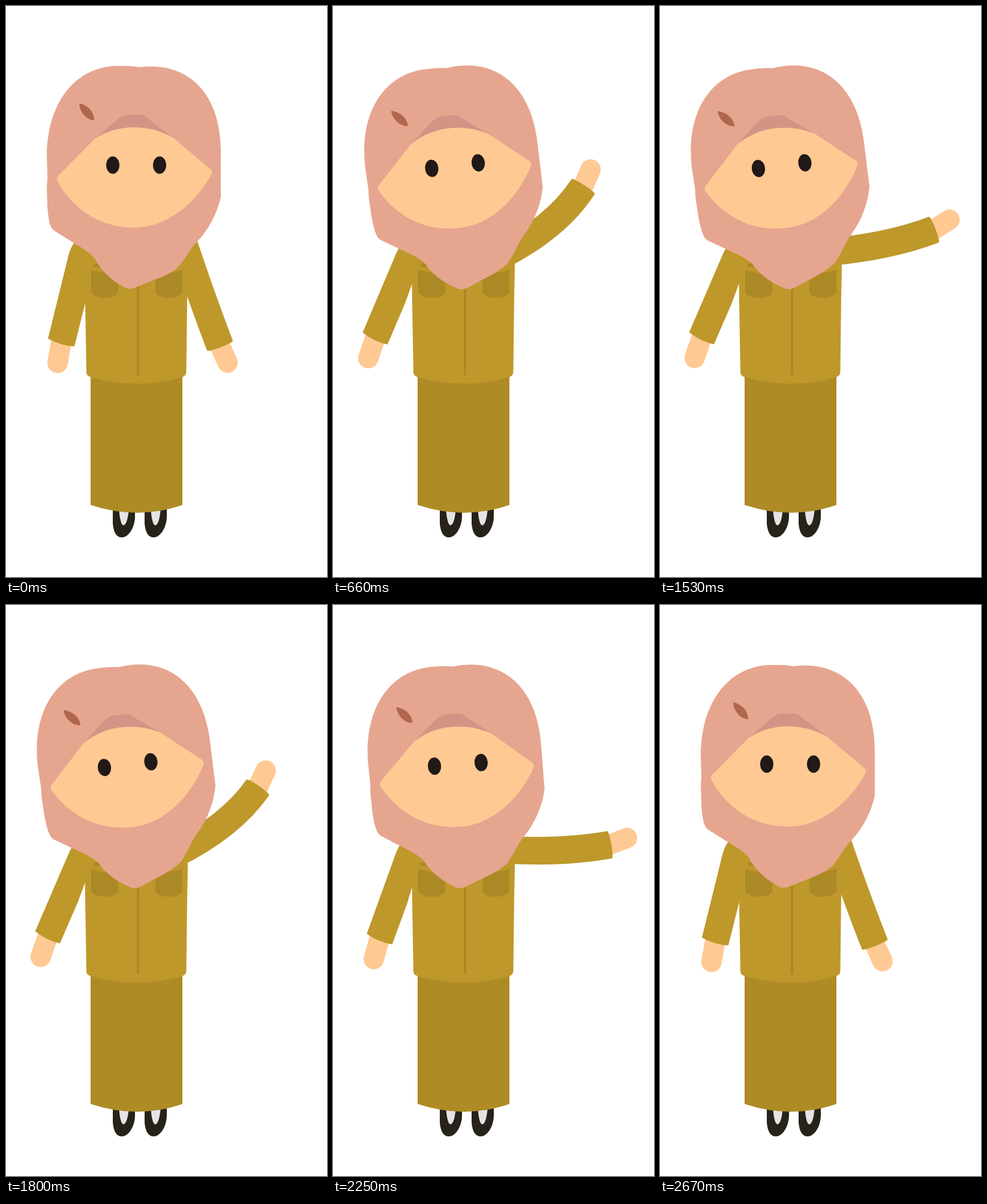
An HTML page that plays this animation: 535x951 px, repeating every 2700 ms.

```html
<!DOCTYPE html>
<html lang="en">
<head>
<meta charset="utf-8">
<title>Waving woman</title>
<style>
  html, body { margin: 0; height: 100%; overflow: hidden; background: #fff; }
  svg { display: block; width: 100%; height: 100%; }
  .cloth { fill: #be982a; }
  .dark { fill: #ae8b25; }
  .skin { fill: #ffc993; }
  .hand { fill: none; stroke: #ffc993; stroke-width: 34; stroke-linecap: round; }
</style>
</head>
<body>
<svg viewBox="0 0 535 951">
  <defs>
    <g id="shoe">
      <path fill="#27231a" d="M178 834V862Q180 885 193 885C205 885 215 867 215 850V834Z"/>
      <path fill="#e4e4e4" d="M188 834Q190 865 196 865Q203 863 205 834Z"/>
    </g>
    <path id="pocket" d="M142 439Q160 446 187 446V477Q182 486 165 486Q148 486 142 477Z"/>
  </defs>

  <use href="#shoe"/>
  <use href="#shoe" x="53"/>
  <path class="dark" d="M141 600H294V831Q220 857 141 831Z"/>

  <g id="leftArm">
    <path class="hand" d="M92 560L86 594.5"/>
    <path class="cloth" d="M70 554L103 420Q108 398 118 390L150 400L132 495L114 567Q92 566 70 554Z"/>
  </g>

  <path id="rightHand" class="hand"/>
  <path id="sleeve" fill="none" stroke="#be982a" stroke-width="46"/>
  <ellipse id="cuff" class="cloth" rx="3" ry="23"/>

  <path class="cloth" d="M131 400H302L303 440L302 485L300.5 610Q300 616 294 618Q220 640 141 618Q134 616 134 610L132 495Z"/>
  <g fill="#ab8926">
    <use href="#pocket"/>
    <use href="#pocket" transform="matrix(-1 0 0 1 436 0)"/>
    <path d="M146 429h14v6h-14zM218 460h4v155h-4z"/>
  </g>

  <g id="head">
    <path fill="#e6a58f" d="M222 102C300 92 360 142 358 248V318C352 345 338 372 319 392C308 403 301 418 287 435C270 450 241 458 215 469Q206 473 198 469C178 458 165 447 152 428C148 415 125 402 112 394L80 374C72 368 71 355 69 335L68 300Q69 290 69 285L68 250C69 160 115 104 180 100Q205 99 222 102Z"/>
    <path fill="#d39486" d="M148 221L188 187Q196 181 204 181H224Q230 181 236 187L278 219L213 210Z"/>
    <path class="skin" d="M86 284L148 221Q178 202 213 202Q248 202 278 219L341 272Q345 276 342 281C318 325 272 369 213 369C150 369 108 332 86 292Q84 288 86 284Z"/>
    <path fill="#b0664f" d="M122 162C136 165 147 176 147 190C138 191 123 180 122 162Z"/>
    <g fill="#201917">
      <ellipse class="eye" cx="178" cy="265"/>
      <ellipse class="eye" cx="256" cy="265"/>
    </g>
  </g>
</svg>
<script>
const LOOP = 2700, STEP = 30;
const SHOULDER = [298, 413], ARM_LENGTH = 163.5;
const $ = id => document.getElementById(id);
const eyes = document.querySelectorAll('.eye');

function ease(t, from, to) {
  const s = Math.min(1, Math.max(0, (t - from) / (to - from)));
  return s * s * (3 - 2 * s);
}

// Point at a distance and angle (degrees, clockwise from the right) from p
function polar([x, y], length, degrees) {
  const a = degrees * Math.PI / 180;
  return [x + length * Math.cos(a), y + length * Math.sin(a)];
}

function drawRightArm(lift) {
  const angle = 69 - lift;
  const bend = 0.18 * lift + 10.5 * (lift / 108) ** 8;
  const tip = angle - 0.4 * bend, base = angle + 0.6 * bend;
  const wrist = polar(SHOULDER, ARM_LENGTH, angle);
  const elbow = polar(wrist, -80, tip);
  const start = polar(polar(SHOULDER, 4.5, base - 90), -20, base);
  const palm = polar(wrist, 31, angle - 3 - 0.18 * lift);
  $('sleeve').setAttribute('d', `M${start}Q${elbow} ${wrist}`);
  $('rightHand').setAttribute('d', `M${wrist}L${palm}`);
  $('cuff').setAttribute('transform', `translate(${wrist}) rotate(${tip})`);
}

function blinkScale(t) {
  const away = Math.min(Math.abs(t - 360), Math.abs(t - 2070));
  return 0.27 + 0.73 * ease(away, 0, 150);
}

function draw(t) {
  const lean = ease(t, 0, 750) - ease(t, 1935, LOOP);
  const dip = ease(t, 750, 1380) - ease(t, 1380, 1935);
  $('head').setAttribute('transform', `rotate(${-7 * lean} 217 382)`);
  $('leftArm').setAttribute('transform', `rotate(${9.5 * lean} 123 420)`);
  drawRightArm(117 * lean - 41 * dip);
  const scale = blinkScale(t);
  for (const eye of eyes) {
    eye.setAttribute('rx', 11 * scale);
    eye.setAttribute('ry', 14.5 * scale);
  }
}

function tick() {
  const t = performance.now() % LOOP;
  draw(Math.floor(t / STEP) * STEP);
  requestAnimationFrame(tick);
}
tick();
</script>
</body>
</html>
```
